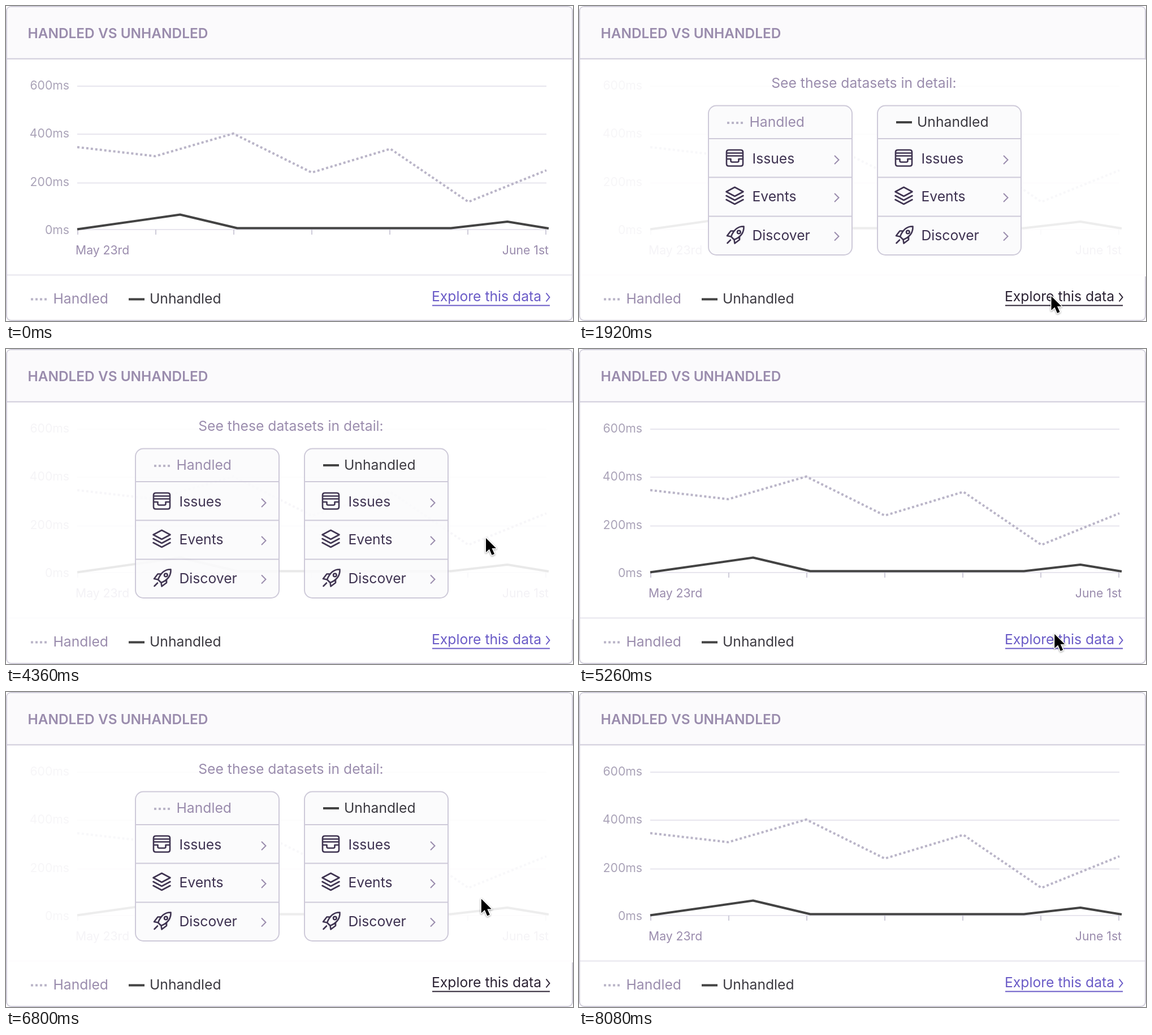
Write an HTML page that moves like this. It is 1003 by 558 pixels and loops after 8.56 s.

```html
<!DOCTYPE html>
<html lang="en">
<head>
<meta charset="utf-8">
<title>Handled vs unhandled</title>
<style>
  html, body { margin: 0; width: 100%; height: 100%; overflow: hidden; background: #fff; }
  svg { display: block; width: 100%; height: 100%; fill: none; }
  text { font: 24.7px Inter, Roboto, sans-serif; fill: #9a8cad; }
  .title { font-weight: 600; font-size: 24.4px; }
  .axis text { font-size: 21.2px; fill: #aaa3b8; }
  .axis .date { fill: #9a8cad; }
  .grid { stroke: #e7e5ee; stroke-width: 2; }
  .ticks { stroke: #cfccda; stroke-width: 2; }
  .dots { stroke: #bab5c8; stroke-width: 4; stroke-dasharray: 4; }
  .solid { stroke: #434343; stroke-width: 4; stroke-linejoin: round; }
  .dark { fill: #3b3940; }
  .box { fill: #fbfbfc; stroke: #cecad9; stroke-width: 2; }
  .row { fill: #3d3150; }
  .icon { stroke: #3f3451; stroke-width: 2.6; stroke-linejoin: round; stroke-linecap: round; }
  .next { stroke: #9a8cad; stroke-width: 2; }
  #link { color: #6a5bc7; }
  #link text { fill: currentColor; }
  #link path { stroke: currentColor; stroke-width: 2; }
  #cursor { fill: #000; stroke: #fff; stroke-width: 3; paint-order: stroke; stroke-linejoin: round;
    filter: drop-shadow(0 1px 1.5px rgba(0, 0, 0, .4)); }
</style>
</head>
<body>
<svg viewBox="0 0 1003 558">
  <rect x="1" y="1" width="1001" height="556" rx="8" stroke="#d0cdda" stroke-width="2"/>
  <path d="M2 92V9Q2 2 9 2H994Q1001 2 1001 9V92Z" fill="#fbfafc"/>
  <path d="M1 93.5H1002" stroke="#cecad9" stroke-width="2"/>
  <text class="title" x="38.5" y="57">HANDLED VS UNHANDLED</text>

  <g class="axis">
    <path class="grid" d="M126 142H956M126 227H956M126 313.5H956M126 396H956M2 476.5H1001"/>
    <path class="ticks" id="ticks"/>
    <g text-anchor="end">
      <text x="112" y="148">600ms</text>
      <text x="112" y="232.5">400ms</text>
      <text x="112" y="319">200ms</text>
      <text x="112" y="403.5">0ms</text>
      <text class="date" x="960" y="440">June 1st</text>
    </g>
    <text class="date" x="123" y="440">May 23rd</text>
  </g>
  <path class="dots" d="M126 250L264 266L402 226L541 295L680 253L818 347L956 291"/>
  <path class="solid" d="M126 395.5L308 369.5L409 393.5H787L887 382L960 394"/>

  <path class="dots" d="M44 519.5H72"/>
  <text x="83.5" y="526.5">Handled</text>
  <path class="solid" d="M217 519.5H245"/>
  <text class="dark" x="254" y="526.5">Unhandled</text>

  <g id="overlay">
    <path d="M2 95H1003V479H2Z" fill="#fff" opacity=".9"/>
    <text x="504" y="145" text-anchor="middle">See these datasets in detail:</text>
    <g id="cards"></g>
  </g>

  <g id="link">
    <text x="753" y="522.5">Explore this data</text>
    <path d="M754 530.5H962M955.5 508.5L961.5 516L955.5 523.5"/>
  </g>
  <path id="cursor" d="M0 0V25L6 19.5L10.5 30L15 28L10.5 18H18Z"/>
</svg>
<script>
const LOOP = 8560;
const $ = id => document.getElementById(id);

const icons = [
  'M265 255H286Q290 255 290 259V279.5Q290 283.5 286 283.5H265Q261 283.5 261 279.5V259Q261 255 265 255Z' +
    'M261 260.5H290M261 265.5H290M261 271H268.5V274Q268.5 276.5 271 276.5H280Q282.5 276.5 282.5 274V271H290',
  'M275.5 321L290.5 329L275.5 337L260.5 329ZM260.5 336L275.5 344L290.5 336M260.5 343L275.5 351L290.5 343',
  'M291.5 390.5C281 390 273.5 397 269 408.5L274.5 414C285.5 409.5 292 401.5 291.5 390.5Z' +
    'M280 400.5a2.8 2.8 0 1 0 5.6 0a2.8 2.8 0 1 0 -5.6 0M274 398.5H268.5L262 407L269 408.5M284 408.5V414L275.5 420.5L274.5 414' +
    'M268 414.5L262.5 420'
];

function card(dx, name, legend, nameX) {
  const rows = ['Issues', 'Events', 'Discover'].map((label, i) => {
    const y = [272.5, 339.5, 408][i];
    return `<path class="icon" d="${icons[i]}"/>
      <text class="row" x="306.5" y="${[279, 346, 415][i]}">${label}</text>
      <path class="next" d="M452 ${y - 7.5}L459.5 ${y}L452 ${y + 7.5}"/>`;
  }).join('');
  return `<g transform="translate(${dx})">
    <rect class="box" x="229" y="176.5" width="254" height="264.5" rx="14"/>
    <path class="box" d="M229 235H483M229 303.5H483M229 372.5H483"/>
    ${legend}<text class="${dx ? 'dark' : ''}" x="${nameX}" y="214">${name}</text>${rows}</g>`;
}

$('cards').innerHTML =
  card(0, 'Handled', '<path class="dots" d="M262 207H290"/>', 301.5) +
  card(299, 'Unhandled', '<path class="solid" d="M262 206H290"/>', 299);
$('ticks').setAttribute('d',
  Array.from({ length: 7 }, (_, i) => `M${127 + i * 138} 396V405`).join(''));

const easeOut = t => 1 - (1 - t) ** 3;
const easeIn = t => t ** 3;
const smooth = t => t * t * (3 - 2 * t);
const progress = (t, start, length) => Math.min(1, Math.max(0, (t - start) / length));

// start, length, easing, then a quadratic curve: from, control, to
const moves = [
  [410, 830, easeOut, [930, -38], [826, 238], [833.5, 514]],
  [1570, 120, easeOut, [833.5, 514], [834, 513.5], [834.5, 513]],
  [3510, 490, easeOut, [834.5, 513], [841, 424], [848, 334]],
  [5070, 350, easeOut, [848, 334], [841, 428], [840, 521.5]],
  [6590, 535, easeOut, [840, 521.5], [850, 421], [834, 321]],
  [7320, 760, easeIn, [834, 321], [834, 142], [925, -38]]
];

function cursorAt(t) {
  const [start, length, ease, a, b, c] = moves.findLast(m => t >= m[0]) || moves[0];
  const s = ease(progress(t, start, length)), r = 1 - s;
  return a.map((v, i) => r * r * v + 2 * r * s * b[i] + s * s * c[i]);
}

// the menu opens and closes twice
const visits = [[1570, 4340], [6010, 7300]];

function draw() {
  const t = performance.now() % LOOP;
  const visit = visits.findLast(v => t >= v[0]);
  const opacity = visit ? smooth(progress(t, visit[0], 320)) - smooth(progress(t, visit[1], 300)) : 0;
  $('overlay').setAttribute('opacity', opacity);
  $('link').style.color = visit && t < visit[1] + 10 ? '#2b2233' : '';
  const [x, y] = cursorAt(t);
  $('cursor').setAttribute('transform', `translate(${x + 1} ${y + 1})`);
  requestAnimationFrame(draw);
}
draw();
</script>
</body>
</html>
```
